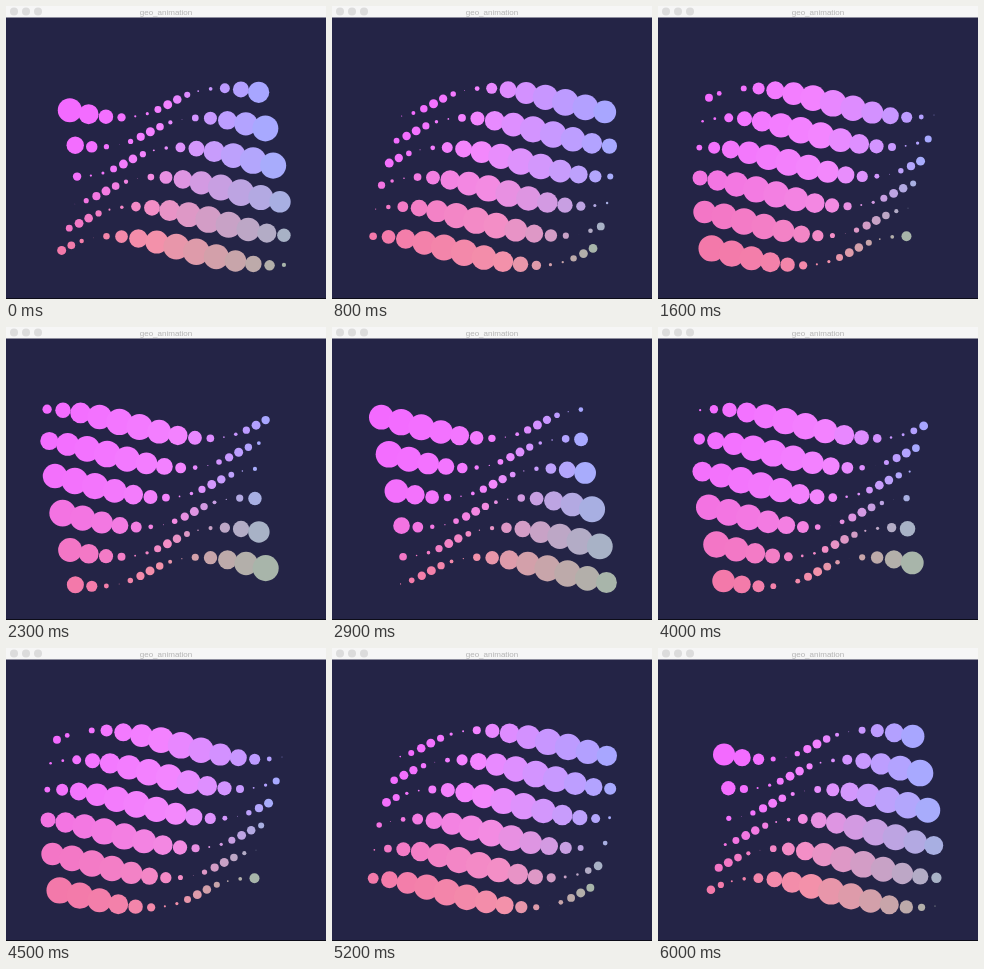
These frames come from a looping animation (320 px wide and 293 px high, 6100 ms). An HTML page with a canvas:

```html
<!DOCTYPE html>
<html>
<head>
<meta charset="utf-8">
<style>
  html, body { margin: 0; width: 100%; height: 100%; overflow: hidden; background: #242446; }
  canvas { display: block; }
</style>
</head>
<body>
<canvas id="stage" width="320" height="293"></canvas>
<script>
const ctx = document.getElementById('stage').getContext('2d');
const LOOP = 6100, STEP = 100;
const COLS = 15, ROWS = 6;
const BLUE = [255, 255, 252, 226, 198, 170];

// Wave phase in radians over time (ms): runs forward, then back.
const PHASE = [[0, .54], [1600, 3.49], [2300, 4.74], [3020, 6.03], [3500, 5.18], [4500, 3.49], [6100, .54]];

function phaseAt(ms) {
  const k = PHASE.findIndex(([t]) => t > ms);
  const [t0, p0] = PHASE[k - 1], [t1, p1] = PHASE[k];
  return p0 + (p1 - p0) * (ms - t0) / (t1 - t0);
}

function disc(x, y, r, fill) {
  ctx.fillStyle = fill;
  ctx.beginPath();
  ctx.arc(x, y, r, 0, 2 * Math.PI);
  ctx.fill();
}

function rect(y, h, fill) {
  ctx.fillStyle = fill;
  ctx.fillRect(0, y, 320, h);
}

function dotColor(col, row) {
  const red = 243 - 75 * Math.max(0, (col - 7) / 7);
  const green = 106 + 60 * (col / 14) ** 1.3 + 3 * row;
  return `rgb(${red}, ${green}, ${BLUE[row]})`;
}

function drawTitleBar() {
  rect(0, 11.5, '#f6f6f6');
  for (const x of [8, 20, 32]) disc(x, 5.5, 4, '#dcdcdc');
  ctx.fillStyle = '#b4b4b4';
  ctx.font = '8px "Liberation Sans", Arial, sans-serif';
  ctx.textAlign = 'center';
  ctx.fillText('geo_animation', 160, 8.5);
}

function draw(ms) {
  const phase = phaseAt(ms);
  rect(0, 293, '#242446');
  rect(292, 1, '#0c0c18');
  for (let row = 0; row < ROWS; row++) {
    for (let col = 0; col < COLS; col++) {
      const angle = phase + .353 * col + .526 * row;
      const shift = Math.sin(angle);
      const x = 56.1 + 14.81 * col + 15 * shift;
      const y = 96.8 + 29.6 * row + 14.6 * shift;
      disc(x, y, Math.abs(4.4 + 8.9 * Math.cos(angle)), dotColor(col, row));
    }
  }
  drawTitleBar();
}

const start = performance.now();
function tick() {
  const ms = (performance.now() - start) % LOOP;
  draw(Math.floor(ms / STEP) * STEP);
  requestAnimationFrame(tick);
}
tick();
</script>
</body>
</html>
```
